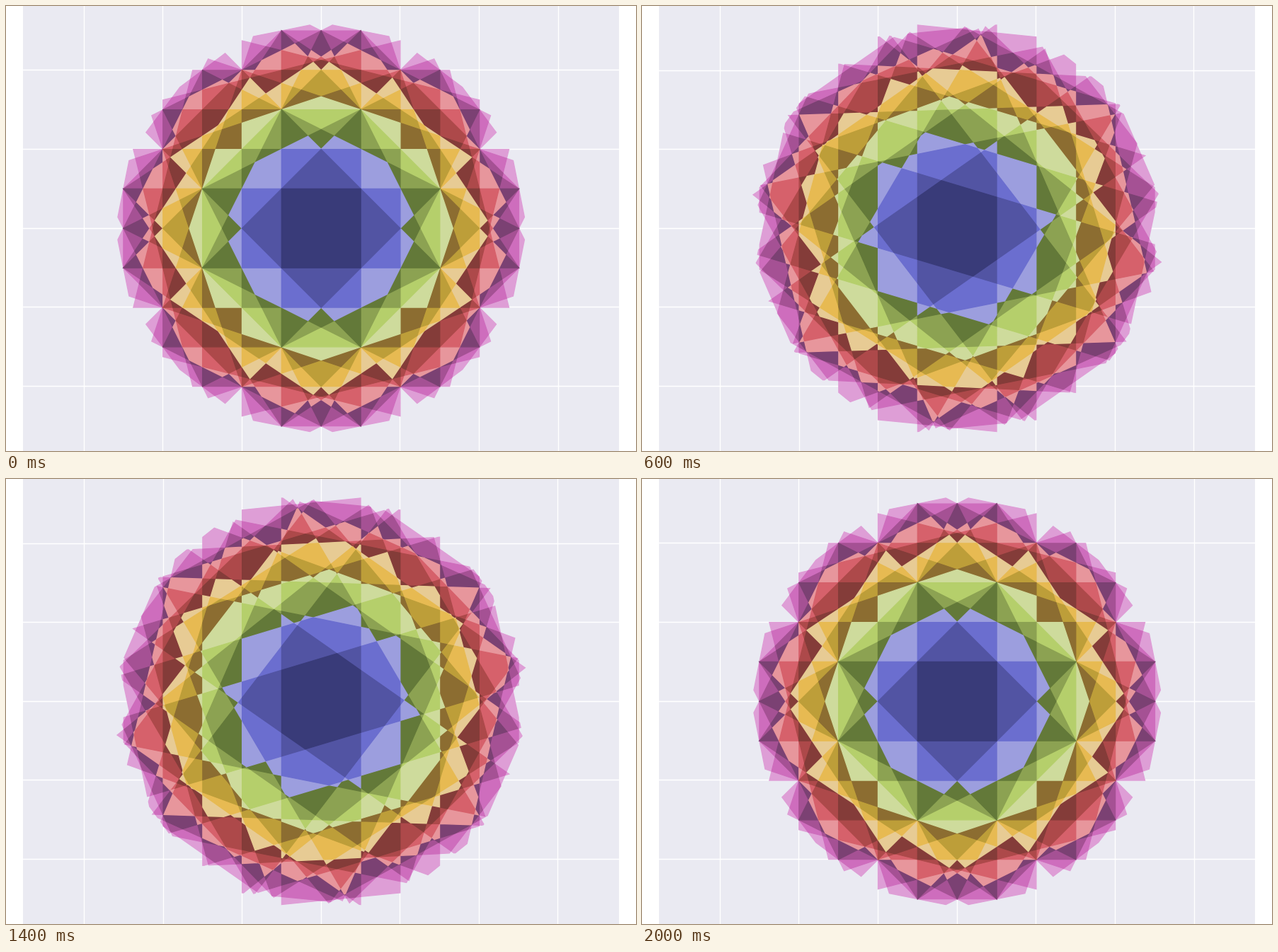
An HTML page with a canvas that plays this animation: 890x629 px, repeating every 2.1 s.

```html
<!DOCTYPE html>
<html lang="en">
<head>
<meta charset="utf-8">
<title>Brillouin zones of a sheared lattice</title>
<style>
  html, body { margin: 0; width: 100%; height: 100%; overflow: hidden; background: #fff; }
  canvas { display: block; }
</style>
</head>
<body>
<canvas id="stage" width="890" height="629"></canvas>
<script>
const ctx = document.getElementById('stage').getContext('2d');
const W = 890, H = 629;
const CX = 445.2, CY = 314.3;
const LEFT = 24, RIGHT = 866;
const HALF_HEIGHT = 287.2;
const LINE = 1.39;
const STEPS = 20, STEP_MS = 100;
const EPS = 1e-9;

const COLORS = [
  '#393b79', '#5254a3', '#6b6ecf', '#9c9ede',
  '#637939', '#8ca252', '#b5cf6b', '#cedb9c',
  '#8c6d31', '#bd9e39', '#e7ba52', '#e7cb94',
  '#843c39', '#ad494a', '#d6616b', '#e7969c',
  '#7b4173', '#a55194', '#ce6dbd', '#de9ed6'
];

// Lattice spanned by (1, 0) and (shear, 1), origin left out.
function latticePoints(shear) {
  const points = [];
  for (let j = -6; j <= 6; j++) {
    for (let i = -12; i <= 12; i++) {
      const x = i + j * shear, y = j;
      const half = (x * x + y * y) / 2;
      if (half > 0 && half < 18) points.push({ x, y, half });
    }
  }
  return points;
}

function tidy(outline) {
  outline.sort((a, b) => a.angle - b.angle);
  const kept = [];
  const same = (a, b) => Math.hypot(a.x - b.x, a.y - b.y) < 1e-6;
  for (const p of outline) {
    if (!kept.length || !same(p, kept[kept.length - 1])) kept.push(p);
  }
  if (kept.length > 1 && same(kept[0], kept[kept.length - 1])) kept.pop();
  return kept;
}

// Outline n encloses the points that have at most n lattice points
// nearer than the origin; its corners are crossings of bisectors.
function zoneOutlines(shear) {
  const points = latticePoints(shear);
  const outlines = COLORS.map(() => []);
  for (let i = 0; i < points.length; i++) {
    for (let j = 0; j < i; j++) {
      const a = points[i], b = points[j];
      const det = a.x * b.y - a.y * b.x;
      if (Math.abs(det) < EPS) continue;
      const x = (a.half * b.y - b.half * a.y) / det;
      const y = (a.x * b.half - b.x * a.half) / det;
      if (x * x + y * y > 8.7) continue;

      let nearer = 0, equal = 0;
      for (const g of points) {
        const d = g.x * x + g.y * y - g.half;
        if (d > EPS) nearer++;
        else if (d > -EPS) equal++;
      }
      const corner = { x, y, angle: Math.atan2(y, x) };
      const end = Math.min(nearer + equal, COLORS.length);
      for (let n = nearer; n < end; n++) outlines[n].push(corner);
    }
  }
  return outlines.map(tidy);
}

const cache = [];
function scene(step) {
  if (!cache[step]) {
    const outlines = zoneOutlines(step / STEPS);
    const top = Math.max(...outlines[outlines.length - 1].map(p => p.y));
    const scale = HALF_HEIGHT / top;
    const paths = outlines.map(outline => {
      const path = new Path2D();
      for (const p of outline) path.lineTo(CX + p.x * scale, CY - p.y * scale);
      path.closePath();
      return path;
    });
    cache[step] = { scale, paths };
  }
  return cache[step];
}

function drawGrid(scale) {
  const snap = v => Math.floor(v) + 0.5;
  ctx.fillStyle = '#fff';
  ctx.fillRect(0, 0, W, H);
  ctx.fillStyle = '#eaeaf2';
  ctx.fillRect(LEFT, 0, RIGHT - LEFT, H);
  ctx.strokeStyle = '#fff';
  ctx.beginPath();
  for (let k = -3; k <= 3; k++) {
    const x = snap(CX + k * scale), y = snap(CY + k * scale);
    ctx.moveTo(x, 0);
    ctx.lineTo(x, H);
    ctx.moveTo(LEFT, y);
    ctx.lineTo(RIGHT, y);
  }
  ctx.stroke();
}

function draw(step) {
  const { scale, paths } = scene(step);
  ctx.lineWidth = LINE;
  drawGrid(scale);
  for (let n = paths.length - 1; n >= 0; n--) {
    ctx.fillStyle = ctx.strokeStyle = COLORS[n];
    ctx.fill(paths[n]);
    ctx.stroke(paths[n]);
  }
}

let shown = -1;
function tick() {
  const step = Math.floor(performance.now() / STEP_MS) % (STEPS + 1);
  if (step !== shown) draw(shown = step);
  requestAnimationFrame(tick);
}
tick();
</script>
</body>
</html>
```
